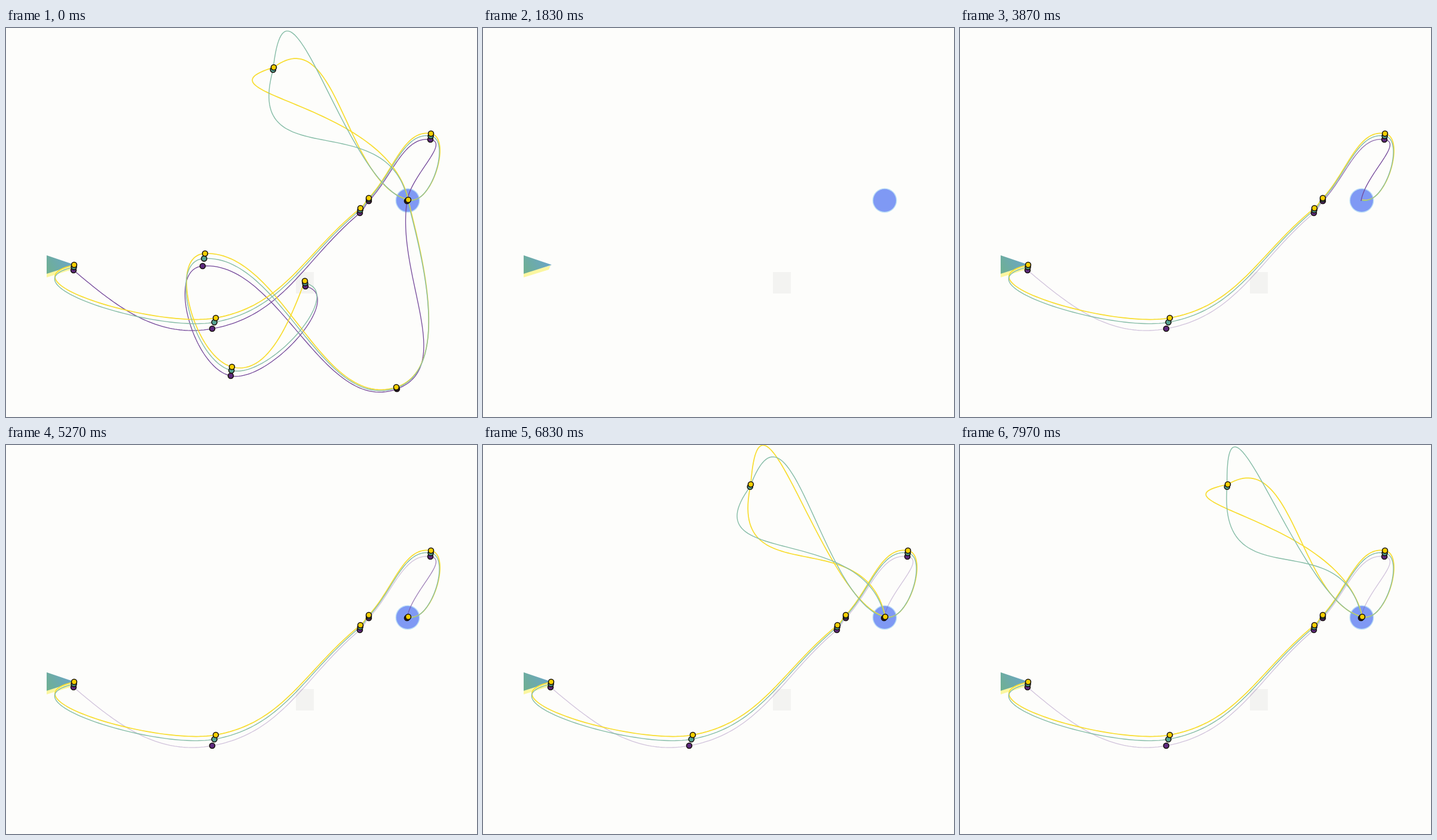
An HTML page with a canvas for the animation above (8 s loop, 788 by 652 pixels).

```html
<!DOCTYPE html>
<html lang="en">
<head>
<meta charset="utf-8">
<title>Curve tracing</title>
<style>
  html, body { margin: 0; width: 100%; height: 100%; overflow: hidden; background: #fdfdfb; }
  canvas { display: block; }
</style>
</head>
<body>
<canvas id="stage" width="788" height="652"></canvas>
<script>
const ctx = document.getElementById('stage').getContext('2d');
const LOOP = 8000, CLEAR = 1700, DRAW = 300, FADE = 900, TOP = 6;

// Key points of the two outer curves; the green one runs between them.
const upper = [[114, 397], [351, 486], [593, 302], [607, 285], [711, 177], [673, 288],
  [448, 66], [653, 602], [333, 378], [378, 568], [500, 424]];
const lower = [[113, 406], [345, 504], [592, 310], [607, 290], [710, 187], [671, 290],
  [445, 76], [654, 605], [329, 399], [376, 583], [501, 433]];

const looped = [0, 1, 2, 3, 4, 5, TOP, 5, 7, 8, 9, 10];
const plain = [0, 1, 2, 3, 4, 5, 7, 8, 9, 10];

// Fixed tangents: heading in degrees, pull as a share of the leg before and after.
const launch = { heading: 167, pull: [0, 0.5] };
const loopExit = { heading: 78, pull: [0.53, 0.18] };
const arrival = { heading: 192, pull: [0.37, 0] };

// swing: angle of the top handle at each of swingTimes; rest: its angle in the full picture.
const swingTimes = [5300, 6830, 7970];
const yellow = { line: '#f8dd30', dot: '#f6d000', width: 1.7, mix: 0, path: looped, traced: 7,
  fixed: { 0: launch, 7: loopExit }, swing: [55, 82, 17], rest: 21 };
const green = { line: '#85bca6', dot: '#55a392', width: 1.4, mix: 0.4, path: looped, traced: 7,
  fixed: { 0: launch, 7: loopExit, 11: arrival }, swing: [45, 54, 92], rest: 78 };
const purple = { line: '#74489a', dot: '#5e2a7e', width: 1.3, mix: 1, path: plain, traced: 5, fades: true,
  fixed: { 9: arrival } };

const clamp = v => Math.max(0, Math.min(1, v));
const ease = v => (1 - Math.cos(Math.PI * clamp(v))) / 2;
const lerp = (a, b, k) => a + (b - a) * k;
const radians = deg => deg * Math.PI / 180;
const add = (a, b, k = 1) => [a[0] + b[0] * k, a[1] + b[1] * k];
const scale = (a, k) => [a[0] * k, a[1] * k];
const sub = (a, b) => add(a, b, -1);
const unit = a => scale(a, 1 / Math.hypot(...a));
const polar = (deg, r) => [r * Math.cos(radians(deg)), r * Math.sin(radians(deg))];

const legStart = i => i < 3 ? 1860 + i * DRAW : i < 5 ? 3270 + (i - 3) * DRAW : 5300 + (i - 5) * DRAW;
const dotStart = n => n === 5 ? 4850 : legStart(n);
const node = (curve, n) => upper[n].map((v, axis) => lerp(v, lower[n][axis], curve.mix));

function swingAngle({ swing, rest }, t) {
  if (t < CLEAR) return rest;
  const i = t < swingTimes[1] ? 0 : 1;
  return lerp(swing[i], swing[i + 1], ease((t - swingTimes[i]) / (swingTimes[i + 1] - swingTimes[i])));
}

// Both handles at a point of the path; null where an open end has no fixed tangent.
function handlesAt(curve, points, i, t) {
  if (curve.path[i] === TOP) {
    const angle = radians(swingAngle(curve, t)), lag = angle - radians(8);
    return [[115 * Math.cos(angle), -226 * Math.sin(angle)], [-148 * Math.cos(lag), 195 * Math.sin(lag)]];
  }
  const before = i > 0 ? sub(points[i], points[i - 1]) : [0, 0];
  const after = i < points.length - 1 ? sub(points[i + 1], points[i]) : [0, 0];
  const d = Math.hypot(...before), e = Math.hypot(...after);
  const fixed = curve.fixed[i];
  if (fixed) return [polar(fixed.heading, -d * fixed.pull[0]), polar(fixed.heading, e * fixed.pull[1])];
  if (!d || !e) return null;
  // Tangent between the neighbouring legs, shorter at sharp turns.
  const wd = d ** 0.7, we = e ** 0.7;
  const tangent = add(scale(unit(before), wd), unit(after), we);
  const pull = 0.28 + 0.12 * Math.hypot(...tangent) / (wd + we);
  return [scale(unit(tangent), -d * pull), scale(unit(tangent), e * pull)];
}

function controlPoints(curve, i, t) {
  const points = curve.path.map(n => node(curve, n));
  const a = points[i], b = points[i + 1];
  const from = handlesAt(curve, points, i, t), to = handlesAt(curve, points, i + 1, t);
  const reach = 0.36 * Math.hypot(...sub(b, a));
  let p = from && add(a, from[1]), q = to && add(b, to[0]);
  p = p || add(a, unit(sub(q, a)), reach);
  q = q || add(b, unit(sub(p, b)), reach);
  return [a, p, q, b];
}

function bezier(points, u) {
  const v = 1 - u, w = [v * v * v, 3 * v * v * u, 3 * v * u * u, u * u * u];
  return points.reduce((sum, p, n) => add(sum, p, w[n]), [0, 0]);
}

function drawLeg(curve, i, t) {
  const full = t < CLEAR;
  const progress = full ? 1 : i < curve.traced ? clamp((t - legStart(i)) / DRAW) : 0;
  if (!progress) return;
  const faded = curve.fades && !full ? clamp((t - dotStart(i + 1)) / FADE) : 0;
  const points = controlPoints(curve, i, t);
  ctx.globalAlpha = 1 - 0.68 * faded;
  ctx.strokeStyle = curve.line;
  ctx.lineWidth = curve.width;
  ctx.beginPath();
  for (let n = 0; n <= 60; n++) ctx.lineTo(...bezier(points, progress * n / 60));
  ctx.stroke();
  ctx.globalAlpha = 1;
}

function disc([x, y], r, color, outline) {
  ctx.beginPath();
  ctx.arc(x, y, r, 0, 2 * Math.PI);
  ctx.fillStyle = color;
  ctx.fill();
  if (!outline) return;
  ctx.strokeStyle = outline;
  ctx.lineWidth = 1.6;
  ctx.stroke();
}

function polygon(color, ...points) {
  ctx.beginPath();
  points.forEach(p => ctx.lineTo(...p));
  ctx.fillStyle = color;
  ctx.fill();
}

const teal = ctx.createLinearGradient(68, 408, 106, 388);
teal.addColorStop(0, '#6fb092');
teal.addColorStop(1, '#6aa5c4');

function drawScenery() {
  ctx.fillStyle = '#fdfdfb';
  ctx.fillRect(0, 0, 788, 652);
  polygon('#fbf6a0', [68, 411], [113, 398], [110, 405], [68, 418]);
  polygon(teal, [68, 381], [115, 397], [68, 412]);
  ctx.fillStyle = '#f3f3f1';
  ctx.fillRect(485, 409, 30, 36);
  disc([672, 289], 20.5, '#b9dcf6');
  disc([672, 289], 19, '#7f99f4');
}

function draw(t) {
  drawScenery();
  for (const curve of [purple, yellow, green])
    for (let i = 0; i < curve.path.length - 1; i++) drawLeg(curve, i, t);
  for (let n = 0; n < upper.length; n++) {
    if (t >= CLEAR && (n > TOP || t < dotStart(n))) continue;
    for (const curve of [purple, green, yellow])
      if (curve.path.includes(n)) disc(node(curve, n), 4.5, curve.dot, '#17120c');
  }
}

const start = performance.now();
function frame() {
  draw((performance.now() - start) % LOOP);
  requestAnimationFrame(frame);
}
frame();
</script>
</body>
</html>
```
